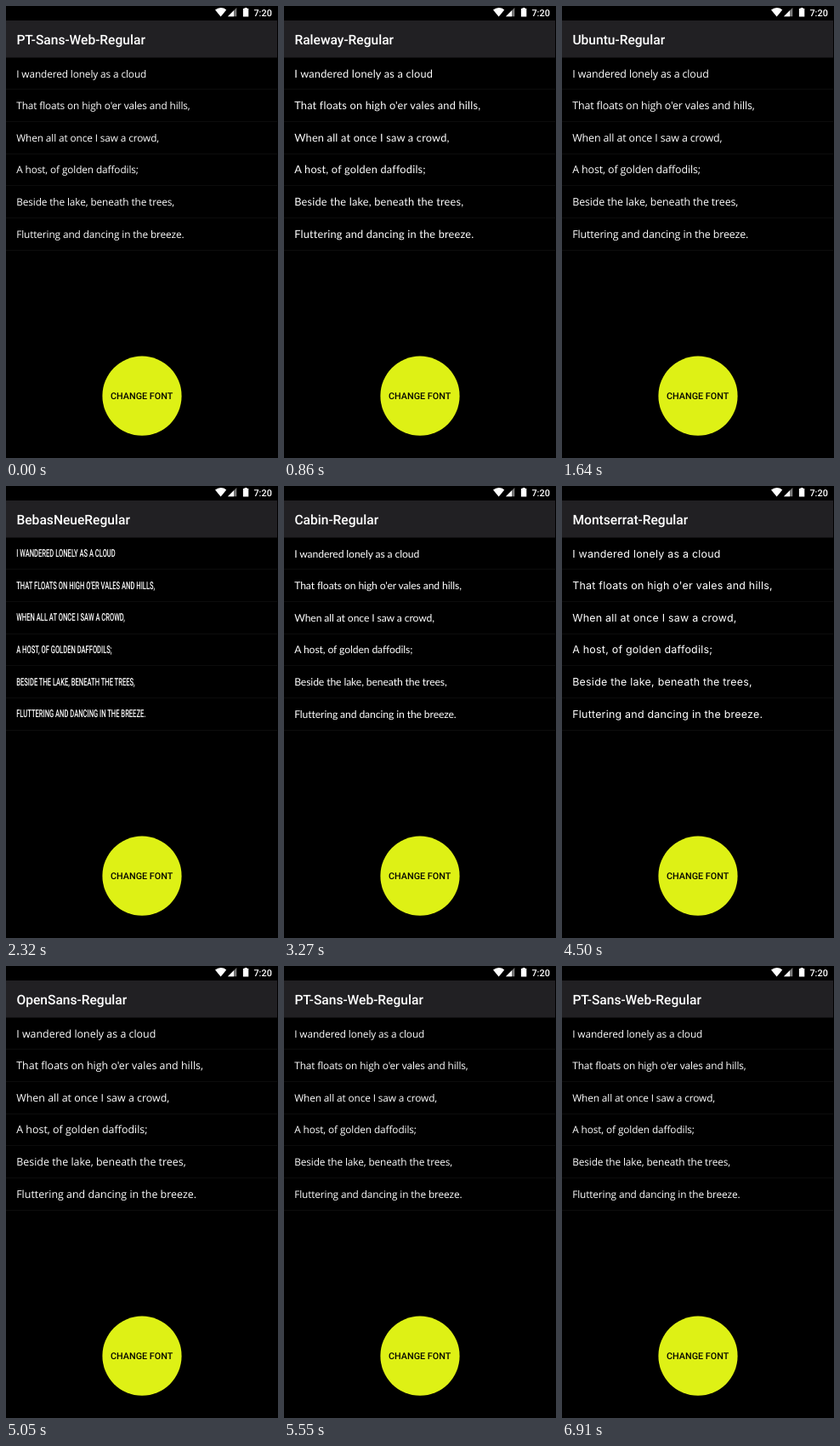
An HTML page for the animation above (7.28 s loop, 320 px wide and 530 px high).

```html
<!DOCTYPE html>
<html lang="en">
<head>
<meta charset="utf-8">
<title>Change font</title>
<style>
  html, body { margin: 0; width: 100%; height: 100%; overflow: hidden; background: #000; }
  svg { display: block; width: 320px; height: 530px; }
  text { font-family: Roboto, sans-serif; fill: #fff; text-rendering: geometricPrecision; white-space: pre; }
  .medium { font-weight: 500; }
  #rows text { font: inherit; }
</style>
</head>
<body>
<svg viewBox="0 0 320 530">
  <defs><clipPath id="disc"><circle cx="160" cy="457.2" r="46.6"/></clipPath></defs>
  <rect width="320" height="530"/>
  <rect y="17" width="319" height="43.5" fill="#212023"/>

  <g fill="#fff">
    <path d="M246 4.5Q252.6-.7 259.2 4.5L252.6 12.6Z"/>
    <path d="M271.3 2V12.3H261Z" fill="#777"/>
    <path d="M268 5.3V12.3H261Z"/>
    <path d="M280.6 2h3v1.1h1.7v9.4h-6.4V3.1h1.7Z"/>
  </g>
  <text class="medium" x="291.4" y="11.8" font-size="10.9">7:20</text>

  <text class="medium" id="title" x="12.4" y="44.8" font-size="15.6"></text>
  <g id="lines" fill="#0c0c0c"></g>
  <g id="rows"></g>

  <circle cx="160" cy="457.2" r="46.6" fill="#def115"/>
  <circle id="ripple" cx="160" cy="457.2" r="0" fill="#fff" clip-path="url(#disc)"/>
  <text class="medium" x="159.7" y="461.4" font-size="10.8" text-anchor="middle" style="fill:#050600">CHANGE FONT</text>
</svg>
<script>
const LOOP = 7280, ROW = 37.65;
const poem = [
  "I wandered lonely as a cloud",
  "That floats on high o'er vales and hills,",
  "When all at once I saw a crowd,",
  "A host, of golden daffodils;",
  "Beside the lake, beneath the trees,",
  "Fluttering and dancing in the breeze."
];

// start time, title, family, size, letter spacing
const ptSans = ["PT-Sans-Web-Regular", "'PT Sans', 'Open Sans'", 11.85, -0.12];
const faces = [
  [0, ...ptSans],
  [860, "Raleway-Regular", "Raleway, Lato", 12.8, 0.18],
  [1590, "Ubuntu-Regular", "Ubuntu, 'Open Sans'", 12.44, -0.13],
  [2320, "BebasNeueRegular", "Roboto", 12.44, 0],
  [2950, "Cabin-Regular", "Cabin, Lato", 12.2, -0.12],
  [3590, "Lato-Regular", "Lato", 12.3, -0.06],
  [4230, "Montserrat-Regular", "Montserrat, Inter", 12.44, 0.24],
  [4860, "OpenSans-Regular", "'Open Sans'", 12.44, 0],
  [5550, ...ptSans]
];

const $ = id => document.getElementById(id);
const add = (parent, tag, attrs) => {
  const el = document.createElementNS("http://www.w3.org/2000/svg", tag);
  for (const k in attrs) el.setAttribute(k, attrs[k]);
  return parent.appendChild(el);
};

const rows = poem.map((_, i) => {
  add($("lines"), "rect", { y: Math.floor(60.2 + ROW * (i + 1)), width: 319, height: 1 });
  return add($("rows"), "text", {});
});

let current;
function setFace(face) {
  if (face === current) return;
  current = face;
  const [, title, family, size, spacing] = face;
  const caps = title.startsWith("Bebas");
  $("title").textContent = title;
  $("rows").style.cssText =
    `font: ${caps ? 500 : 400} ${size}px ${family}, sans-serif; letter-spacing: ${spacing}px`;
  rows.forEach((row, i) => {
    const y = (caps ? 83.1 : 83.5) + ROW * i;
    row.textContent = caps ? poem[i].toUpperCase() : poem[i];
    row.setAttribute("transform", `translate(12.2 ${y}) scale(${caps ? 0.608 : 1} 1)`);
  });
}

function draw(t) {
  setFace(faces.findLast(f => f[0] <= t));
  const pressed = t >= 90 && t < 500;
  const grow = Math.min(1, (t - 45) / 315);
  $("ripple").setAttribute("r", pressed ? 46.6 * grow : 0);
  $("ripple").setAttribute("opacity", pressed ? 0.12 * Math.min(1, (500 - t) / 140) : 0);
}

function tick() {
  draw(performance.now() % LOOP);
  requestAnimationFrame(tick);
}
tick();
</script>
</body>
</html>
```
